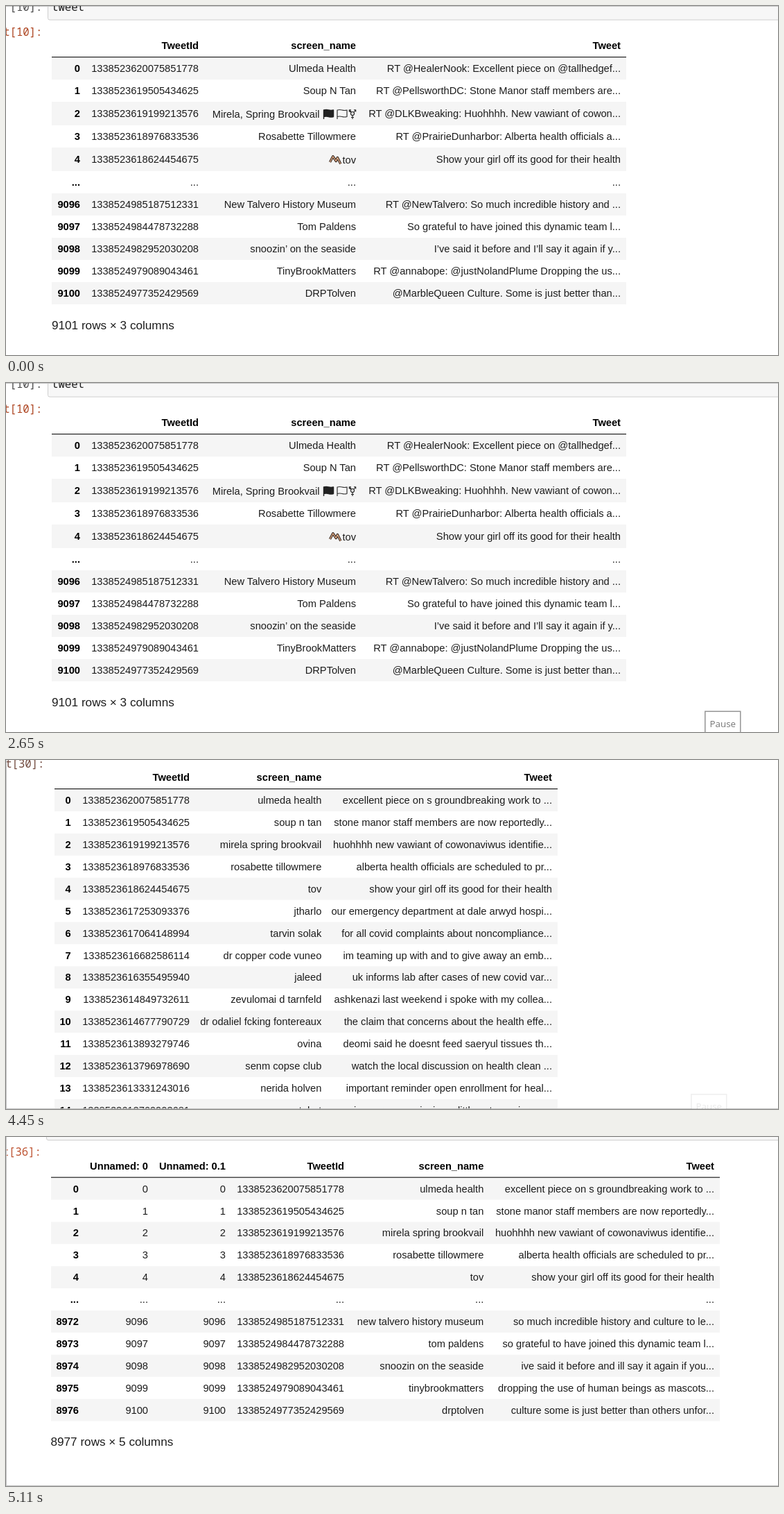
Recreate the animation shown at these times as an HTML page. Size 1114 px wide and 503 px high, loop 8 s.

```html
<!DOCTYPE html>
<html lang="en">
<head>
<meta charset="utf-8">
<title>Notebook tables</title>
<style>
  html, body { margin: 0; width: 100%; height: 100%; overflow: hidden; background: #fff; }
  svg { display: block; width: 1114px; height: 503px; }
  text { font: 14.67px "Liberation Sans", Arial, sans-serif; fill: #1c1c1c; white-space: pre; }
  .end { text-anchor: end; }
  .bold { font-weight: bold; fill: #000; }
  .foot { font-size: 17.15px; }
  .mono { font: 500 15.65px "Noto Sans Mono", "DejaVu Sans Mono", monospace; }
  .tip text { font: 13.4px "Open Sans", "Noto Sans", sans-serif; fill: #575757; }
</style>
</head>
<body>
<svg id="stage" viewBox="0 0 1114 503"></svg>
<script>
const stage = document.getElementById('stage');

function add(parent, tag, attrs, content) {
  const el = document.createElementNS('http://www.w3.org/2000/svg', tag);
  for (const key in attrs) el.setAttribute(key, attrs[key]);
  if (content !== undefined) el.textContent = content;
  parent.append(el);
  return el;
}

const rect = (parent, x, y, width, height, fill) => add(parent, 'rect', { x, y, width, height, fill });
const label = (parent, x, y, cls, str) => add(parent, 'text', { x, y, class: cls }, str);

function prompt(parent, x, y, str, fill) {
  label(parent, x, y, 'mono end', str).style.fill = fill;
}

function inputBox(parent, x, bottom) {
  add(parent, 'rect', { x: x + .5, y: bottom - 60, width: 1200, height: 60, rx: 2.5, fill: '#f7f7f7', stroke: '#cfcfcf' });
}

// cols holds the right edge of every column, the index first
function table(parent, { left, right, top, cols, head, rows, pitch, tall = {} }) {
  head.forEach((str, i) => label(parent, cols[i + 1], top - 11.6, 'bold end', str));
  let y = top;
  rows.forEach((row, r) => {
    const h = tall[r] || pitch;
    if (r % 2 === 0) rect(parent, left, y, right - left, h, '#f5f5f5');
    row.forEach((str, i) => label(parent, cols[i], y + h / 2 + 5.1, i ? 'end' : 'bold end', str));
    y += h;
  });
  rect(parent, left, top - 1, right - left, 1.2, '#222');
}

function frameLines(parent) {
  rect(parent, 0, 0, 1, 503, '#c4c4c4');
  rect(parent, 0, 502, 1114, 1, '#c4c4c4');
}

const firstIds = ['1338523620075851778', '1338523619505434625', '1338523619199213576',
  '1338523618976833536', '1338523618624454675'];
const lastIds = ['1338524985187512331', '1338524984478732288', '1338524982952030208',
  '1338524979089043461', '1338524977352429569'];
const cleanHead = [
  ['ulmeda health', 'excellent piece on s groundbreaking work to ...'],
  ['soup n tan', 'stone manor staff members are now reportedly...'],
  ['mirela spring brookvail', 'huohhhh new vawiant of cowonaviwus identifie...'],
  ['rosabette tillowmere', 'alberta health officials are scheduled to pr...'],
  ['tov', 'show your girl off its good for their health']
];

function emoji(g) {
  const path = (d, fill, stroke, width) =>
    add(g, 'path', { d, fill, stroke, 'stroke-width': width, 'stroke-linejoin': 'round' });
  const flag = 'q3.5 -1 7 0 t7 0 v9.5 q-3.5 1 -7 0 t-7 0';
  path('M458.5 163 V150 ' + flag, '#222', '#222', 1.4);
  path('M478 163 V150 ' + flag, 'none', '#333', 1.2);
  add(g, 'circle', { cx: 500, cy: 155, r: 2.5, fill: 'none', stroke: '#222', 'stroke-width': 1.2 });
  path('M500 157.6 V163 M498 160.5 H502 M498 153 L495.5 150 M495.3 152.5 V149.8 H498 ' +
    'M496 152.8 L498 151 M502 153 L504.5 150 M502 149.8 H504.7 V152.5', 'none', '#222', 1.1);
  const mark = 'M467.5 225 L471.8 216.8 L476.2 223.5 L478.4 218.5 L482.8 227.5';
  path(mark, 'none', '#33261f', 3.4);
  path(mark, 'none', '#e8b08a', 1.3);
}

function rawScene(g) {
  inputBox(g, 60, 20);
  rect(g, 0, 0, 1114, 1, '#c4c4c4');
  prompt(g, 52.5, 7, '[10]:', '#4a4a4a');
  label(g, 66, 7, 'mono', 'tweet');
  prompt(g, 52.5, 43, 't[10]:', '#ad4420');
  const head = [
    ['Ulmeda Health', 'RT @HealerNook: Excellent piece on @tallhedgef...'],
    ['Soup N Tan', 'RT @PellsworthDC: Stone Manor staff members are...'],
    ['', 'RT @DLKBweaking: Huohhhh. New vawiant of cowon...'],
    ['Rosabette Tillowmere', 'RT @PrairieDunharbor: Alberta health officials a...'],
    ['', 'Show your girl off its good for their health']
  ];
  const tail = [
    ['New Talvero History Museum', 'RT @NewTalvero: So much incredible history and ...'],
    ['Tom Paldens', 'So grateful to have joined this dynamic team l...'],
    ['snoozin’ on the seaside', 'I’ve said it before and I’ll say it again if y...'],
    ['TinyBrookMatters', 'RT @annabope: @justNolandPlume Dropping the us...'],
    ['DRPTolven', '@MarbleQueen Culture. Some is just better than...']
  ];
  table(g, {
    left: 66, right: 895, top: 74, pitch: 32, tall: { 2: 34, 4: 34 },
    cols: [107, 278, 505, 887],
    head: ['TweetId', 'screen_name', 'Tweet'],
    rows: [
      ...head.map((r, i) => [i, firstIds[i], ...r]),
      Array(4).fill('...'),
      ...tail.map((r, i) => [9096 + i, lastIds[i], ...r])
    ]
  });
  // names with emoji sit a little lower than the rest of their row
  label(g, 452.5, 161, 'end', 'Mirela, Spring Brookvail');
  label(g, 505, 227, 'end', 'tov');
  emoji(g);
  label(g, 66, 465.5, 'foot', '9101 rows × 3 columns');
}

function cleanScene(g) {
  prompt(g, 55.5, 10.5, 't[30]:', '#70483c');
  const more = [
    ['1338523617253093376', 'jtharlo', 'our emergency department at dale arwyd hospi...'],
    ['1338523617064148994', 'tarvin solak', 'for all covid complaints about noncompliance...'],
    ['1338523616682586114', 'dr copper code vuneo', 'im teaming up with and to give away an emb...'],
    ['1338523616355495940', 'jaleed', 'uk informs lab after cases of new covid var...'],
    ['1338523614849732611', 'zevulomai d tarnfeld', 'ashkenazi last weekend i spoke with my collea...'],
    ['1338523614677790729', 'dr odaliel fcking fontereaux', 'the claim that concerns about the health effe...'],
    ['1338523613893279746', 'ovina', 'deomi said he doesnt feed saeryul tissues th...'],
    ['1338523613796978690', 'senm copse club', 'watch the local discussion on health clean ...'],
    ['1338523613331243016', 'nerida holven', 'important reminder open enrollment for heal...'],
    ['1338523612769903681', 'tohet', 'is everyone enjoying a little extra major go...']
  ];
  table(g, {
    left: 70, right: 796, top: 42, pitch: 31.92,
    cols: [93.7, 265, 455.3, 788],
    head: ['TweetId', 'screen_name', 'Tweet'],
    rows: [...cleanHead.map((r, i) => [firstIds[i], ...r]), ...more].map((r, i) => [i, ...r])
  });
  frameLines(g);
}

function savedScene(g) {
  inputBox(g, 58, 4.5);
  prompt(g, 51, 27, 't[36]:', '#bd5230');
  const tail = [
    ['new talvero history museum', 'so much incredible history and culture to le...'],
    ['tom paldens', 'so grateful to have joined this dynamic team l...'],
    ['snoozin on the seaside', 'ive said it before and ill say it again if you...'],
    ['tinybrookmatters', 'dropping the use of human beings as mascots...'],
    ['drptolven', 'culture some is just better than others unfor...']
  ];
  table(g, {
    left: 65, right: 1030, top: 58.6, pitch: 31.9,
    cols: [105, 205, 317, 488, 689.3, 1022],
    head: ['Unnamed: 0', 'Unnamed: 0.1', 'TweetId', 'screen_name', 'Tweet'],
    rows: [
      ...cleanHead.map((r, i) => [i, i, i, firstIds[i], ...r]),
      Array(6).fill('...'),
      ...tail.map((r, i) => [8972 + i, 9096 + i, 9096 + i, lastIds[i], ...r])
    ]
  });
  label(g, 64.5, 445, 'foot', '8977 rows × 5 columns');
  frameLines(g);
}

const scenes = [rawScene, cleanScene, savedScene].map(draw => {
  const g = add(stage, 'g', {});
  draw(g);
  return g;
});

const glow = add(stage, 'circle', { cx: 1006, cy: 510, r: 14, fill: '#fff04a' });
const tip = add(stage, 'g', { class: 'tip' });
add(tip, 'rect', { x: 1008.8, y: 473.3, width: 51, height: 42, fill: '#fff', stroke: '#7a7a7a', 'stroke-width': 1.5 });
label(tip, 1015.5, 495.7, '', 'Pause');

// start ms, scene, tooltip opacity, pointer glow
const steps = [
  [0, 0, 0, 0],
  [1100, 0, .3, 0],
  [1170, 0, .7, 0],
  [1240, 0, 1, 0],
  [2650, 0, .8, 0],
  [2730, 0, .5, 1],
  [2800, 1, 0, 0],
  [4450, 1, .12, 0],
  [4500, 1, .55, 0],
  [4570, 1, 1, 0],
  [4970, 1, .75, 0],
  [5050, 1, .42, 0],
  [5110, 2, 0, 0]
];
const LOOP = 8000;
const start = performance.now();
let shown;

function tick() {
  const t = (performance.now() - start) % LOOP;
  const step = steps.findLast(s => s[0] <= t);
  if (step !== shown) {
    shown = step;
    const [, scene, opacity, lit] = step;
    scenes.forEach((g, i) => g.setAttribute('display', i === scene ? 'inline' : 'none'));
    tip.setAttribute('opacity', opacity);
    tip.setAttribute('transform', scene === 1 ? 'translate(-20 8.6)' : '');
    glow.setAttribute('opacity', lit);
  }
  requestAnimationFrame(tick);
}
tick();
</script>
</body>
</html>
```
